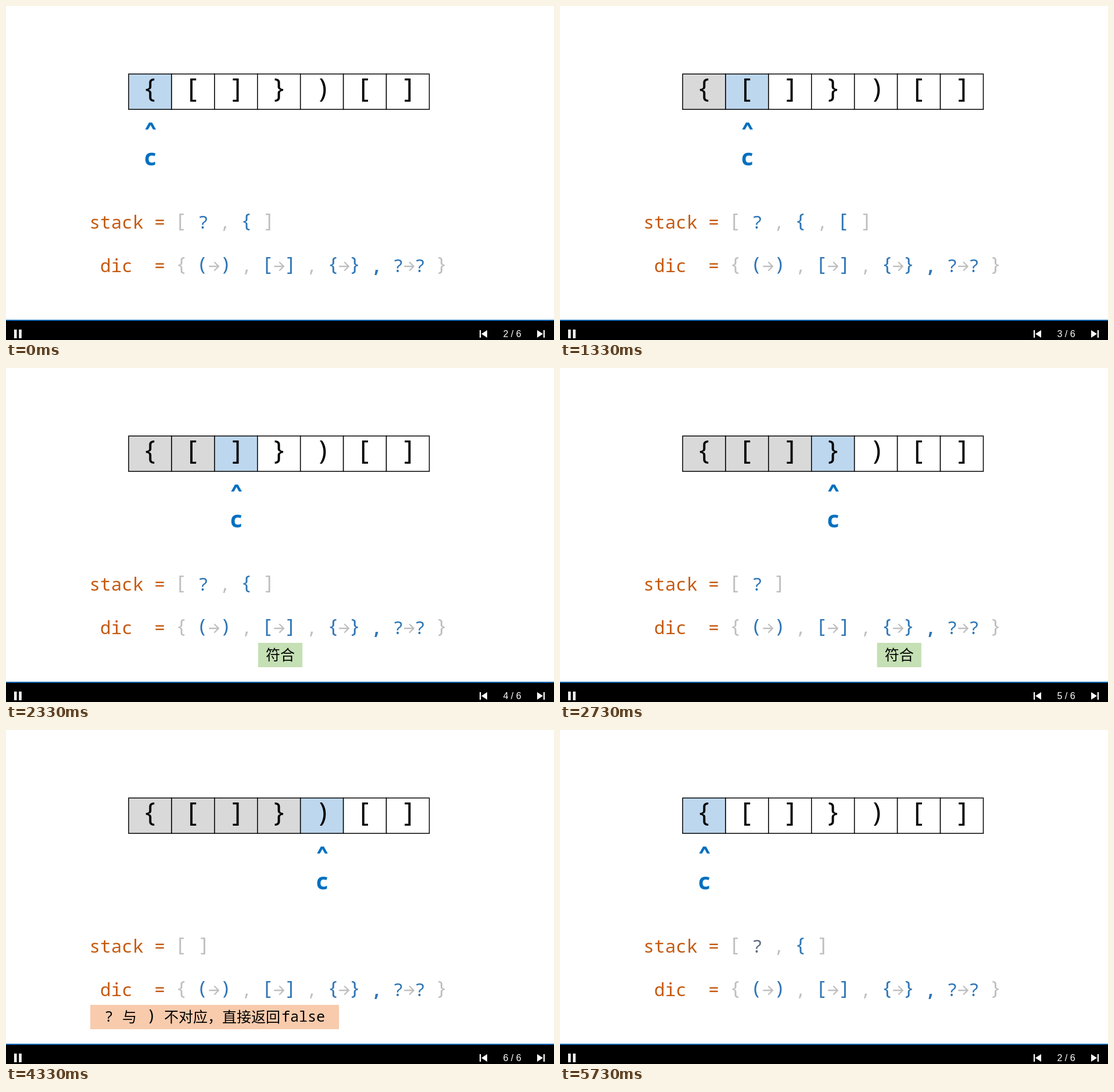
These frames come from a looping animation (943x576 px, 6240 ms). An HTML page:

```html
<!DOCTYPE html>
<html lang="zh-CN">
<head>
<meta charset="utf-8">
<title>Bracket matching</title>
<style>
  html, body { margin: 0; height: 100%; overflow: hidden; background: #fff; }
  svg { display: block; width: 100%; height: 100%; }
  text { font-family: "Noto Sans Mono", "DejaVu Sans Mono", monospace; }
  .mid { text-anchor: middle; }
  .cjk { font-family: "Noto Sans CJK SC", "Noto Sans CJK", sans-serif; font-weight: 300; }
  .page { font-family: "Liberation Sans", Arial, sans-serif; }
</style>
</head>
<body>
<svg viewBox="0 0 943 576">
  <g id="scene"></g>
  <path d="M0 541H943V576H0z"/>
  <path d="M0 541H943V543H0z" fill="#0f6ab8"/>
  <path fill="#fff" d="M14 558h4.5v15h-4.5z M22.3 558h4.5v15h-4.5z
    M815 559h2.2v13h-2.2z M828 559v13l-10-6.5z
    M914 559v13l10-6.5z M924.8 559h2.2v13h-2.2z"/>
  <text id="page" class="page mid" x="871" y="571" font-size="16" fill="#fff"></text>
</svg>
<script>
const LOOP = 6240, STEP = 1000, LEAD = 270;
const ORANGE = '#c55a11', GREY = '#bfbfbf', BLUE = '#2e75b6', DARK = '#5f6b80', POINTER = '#0070c0';
const INPUT = '{[]})[]';
const STACKS = ['?', '?{', '?{[', '?{', '?', ''];   // contents on pages 1 to 6
const scene = document.getElementById('scene');
const pageLabel = document.getElementById('page');

const text = (s, x, y, size, fill = '#000', cls = 'mid', extra = '') =>
  `<text class="${cls}" x="${x}" y="${y}" font-size="${size}" fill="${fill}" ${extra}>${s}</text>`;

const rect = (x, y, w, h, fill, extra = '') =>
  `<rect x="${x}" y="${y}" width="${w}" height="${h}" fill="${fill}" ${extra}/>`;

const arrow = (x, y, color) =>
  `<path d="M${x - 8.5} ${y - 9.5}h16 m-7 -7.5l7.5 7.5l-7.5 7.5" fill="none" stroke="${color}" stroke-width="2.3"/>`;

// Round and square brackets sit off-centre in the font; move them back to the middle.
function bracket(ch, x, y, size, color) {
  const side = '(['.includes(ch) ? -1 : ')]'.includes(ch) ? 1 : 0;
  return text(ch, x + side * size * 0.045, y, size, color);
}

// One line of code on a fixed character grid, from [colour, string, bold] runs.
function codeLine(y, runs) {
  let col = 0, out = '';
  for (const [color, str, bold] of runs) {
    for (const ch of str) {
      const x = 152.7 + 18.65 * col++;
      if (ch === '→') out += arrow(x, y, color);
      else if ('()[]{}'.includes(ch)) out += bracket(ch, x, y - 2, 33.5, color);
      else if (ch !== ' ') out += text(ch, x, y, 31, color, 'mid', bold ? 'font-weight="700"' : '');
    }
  }
  return out;
}

function array(current) {
  const pitch = 73.92, left = 211, top = 117.3;
  let out = '';
  [...INPUT].forEach((ch, i) => {
    const fill = i === current ? '#bdd7ee' : i < current ? '#d9d9d9' : '#fff';
    const x = left + i * pitch;
    out += rect(x, top, pitch, 61, fill, 'stroke="#000" stroke-width="1.5"');
    out += bracket(ch, x + pitch / 2, 157.7, 45);
  });
  if (current >= 0) {
    const x = left + (current + 0.5) * pitch + 0.8;
    out += `<path d="M${x - 9.3} 213L${x - 2.6} 201h5.2L${x + 9.3} 213h-5L${x} 205.3L${x - 4.3} 213z" fill="${POINTER}"/>`;
    out += text('c', x, 274.5, 39, POINTER, 'mid', 'font-weight="700"');
  }
  return out;
}

function stack(items, firstColor) {
  const runs = [[ORANGE, 'stack = '], [GREY, '[ ']];
  [...items].forEach((ch, i) => {
    if (i) runs.push([GREY, ', ']);
    runs.push([i ? BLUE : firstColor, ch + ' ']);
  });
  return codeLine(384, [...runs, [GREY, ']']]);
}

function dictionary() {
  const runs = [[ORANGE, ' dic  = '], [GREY, '{ ']];
  ['()', '[]', '{}', '??'].forEach(([open, close], i) => {
    if (i) runs.push(i === 3 ? [BLUE, ', ', true] : [GREY, ', ']);
    runs.push([BLUE, open], [GREY, '→'], [BLUE, close + ' ']);
  });
  return codeLine(458.5, [...runs, [GREY, '}']]);
}

const match = x => rect(x, 474, 76.3, 42, '#c5e0b4') +
  text('符合', x + 38.2, 504, 25, '#000', 'cjk mid');

const mismatch = () => rect(145, 474, 428, 42, '#f8cbad') +
  text('?', 177, 502.5, 25) + text('与', 200, 503.5, 25, '#000', 'cjk') +
  bracket(')', 249, 502, 27) +
  text('不对应，直接返回', 272, 503.5, 25, '#000', 'cjk') +
  text('false', 474, 502.5, 25, '#000', '');

function draw(step) {
  const page = (step + 1) % 6 + 1;
  const notes = { 4: () => match(433.8), 5: () => match(545.5), 6: mismatch };
  scene.innerHTML = array(page - 2) + stack(STACKS[page - 1], step >= 5 ? DARK : BLUE) +
    dictionary() + (notes[page] ? notes[page]() : '');
  pageLabel.textContent = `${page} / 6`;
}

const start = performance.now();
let shown = -1;
function frame(now) {
  const time = Math.max(0, now - start) % LOOP;
  const step = Math.floor((time + LEAD) / STEP);
  if (step !== shown) draw(shown = step);
  requestAnimationFrame(frame);
}
frame(start);
</script>
</body>
</html>
```
